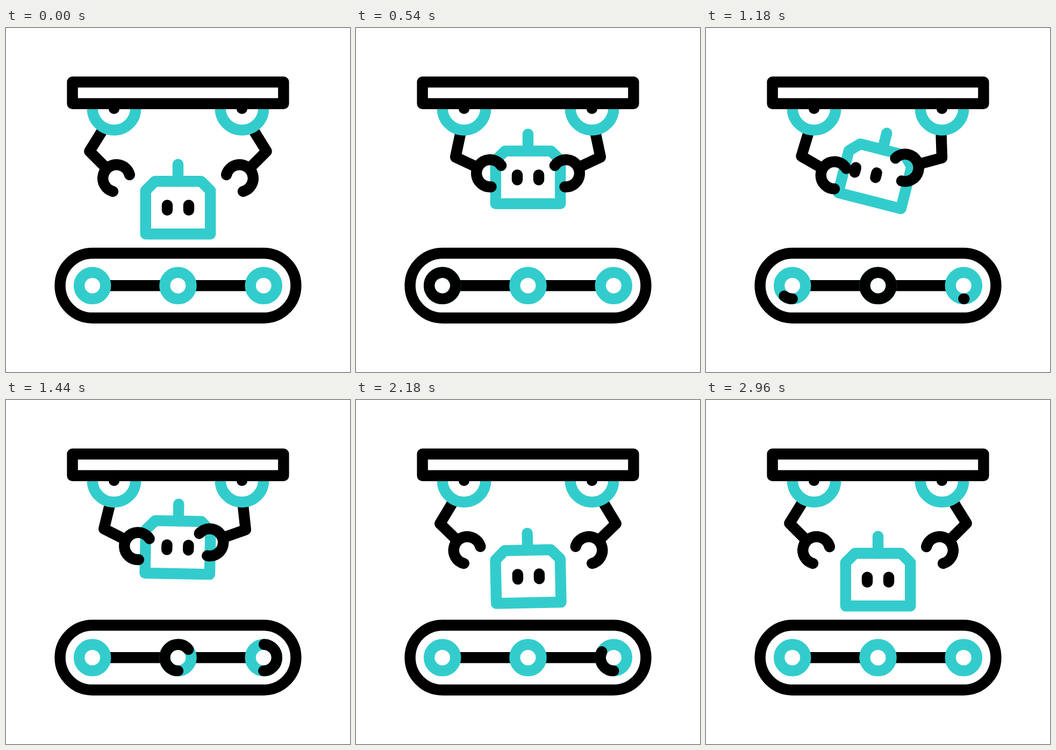
Write an HTML page with a canvas that moves like this. It is 640 px wide and 640 px high and loops after 3000 ms.

```html
<!DOCTYPE html>
<html lang="en">
<head>
<meta charset="utf-8">
<title>Robot assembly line</title>
<style>
html, body { margin: 0; width: 100%; height: 100%; overflow: hidden; background: #fff; }
canvas { display: block; width: 640px; height: 640px; }
</style>
</head>
<body>
<canvas id="stage" width="640" height="640"></canvas>
<script>
const ctx = document.getElementById('stage').getContext('2d');
const LOOP = 3000, STEP = 20, MID = 320;
const BLACK = '#000', TEAL = '#33cccc';
const TAU = Math.PI * 2, DEG = Math.PI / 180;

const ease = (t, from, to) => {
  const x = Math.min(1, Math.max(0, (t - from) / (to - from)));
  return x * x * (3 - 2 * x);
};

function pose(t) {
  const grab = ease(t, 200, 600);
  const swing = ease(t, 800, 1200);
  const back = ease(t, 1200, 1680);
  const release = ease(t, 1680, 2240);
  const drop = ease(t, 1680, 2300);
  const hop = ease(t, 2300, 2630) - ease(t, 2630, 2960);
  const reach = 21.2 * (grab - release), sway = swing - back;
  return {
    lift: 60 * (grab - drop) + 30 * hop,
    tilt: 14.4 * sway - 12.1 * (back - drop),
    gaze: -20 * sway + 19.3 * (back - release),
    left: reach - 6.2 * sway,
    right: reach + 8.8 * sway
  };
}

function stroke(color, cap = 'round') {
  ctx.strokeStyle = color;
  ctx.lineCap = cap;
  ctx.stroke();
}

function line(points, color, cap) {
  ctx.beginPath();
  for (const [x, y] of points) ctx.lineTo(x, y);
  stroke(color, cap);
}

function arc(x, y, r, from, to, color, cap) {
  ctx.beginPath();
  ctx.arc(x, y, r, from, to);
  stroke(color, cap);
}

function robot({ lift, tilt, gaze }) {
  const w = 60.2, top = -34.3, bottom = 63.7, cut = 17.3;
  ctx.save();
  ctx.translate(MID, 319.5 - lift);
  ctx.rotate(tilt * DEG);
  line([[0, -65.8], [0, top]], TEAL);
  ctx.beginPath();
  for (const s of [-1, 1]) {
    const side = [[s * w, bottom], [s * w, top + cut], [s * (w - cut), top]];
    if (s > 0) side.reverse();
    for (const [x, y] of side) ctx.lineTo(x, y);
  }
  ctx.closePath();
  stroke(TEAL);
  for (const x of [gaze - 20, gaze + 20]) line([[x, 10.3], [x, 19.3]], BLACK);
  ctx.restore();
}

// Left-hand arm with its shoulder at the origin; the right one is mirrored
function arm(side, angle) {
  ctx.save();
  ctx.translate(MID, 150);
  ctx.scale(side, 1);
  ctx.translate(-119, 0);

  ctx.save();
  ctx.rotate(-angle * DEG);
  line([[-19, 36.4], [-45.7, 79.4], [-13.2, 111.9]], BLACK, 'butt');
  arc(4.5, 129.6, 25.3, 105 * DEG, 345 * DEG, BLACK);
  ctx.restore();

  arc(0, -0.3, 40.2, 0, Math.PI, TEAL, 'butt');
  line([[0, -9], [0, -0.3]], BLACK);
  ctx.restore();
}

function roller(x, t) {
  const y = 479.3, r = 24.6;
  arc(x, y, r, 0, TAU, TEAL);
  const head = ease(t, 12, 592), tail = ease(t, 554, 1338);
  if (head <= 0 || tail >= 1) return;
  const at = p => (0.25 - p) * TAU;
  arc(x, y, r, at(head), at(tail), BLACK);
}

function belt(t) {
  ctx.beginPath();
  ctx.roundRect(100.6, 419, 438.8, 120.5, 60.2);
  stroke(BLACK);
  for (const x of [185, 345]) line([[x, 479.3], [x + 110, 479.3]], BLACK, 'butt');
  for (let i = 0; i < 3; i++) roller(MID + (i - 1) * 159.3, t - i * 570);
}

function draw(t) {
  const p = pose(t);
  ctx.fillStyle = '#fff';
  ctx.fillRect(0, 0, 640, 640);
  ctx.lineWidth = 20.4;
  ctx.lineJoin = 'round';
  belt(t);
  robot(p);
  arm(1, p.left);
  arm(-1, p.right);
  ctx.strokeStyle = BLACK;
  ctx.strokeRect(123.6, 100.5, 392.8, 40.3);
}

function tick() {
  const t = performance.now() % LOOP;
  draw(Math.floor(t / STEP) * STEP);
  requestAnimationFrame(tick);
}
tick();
</script>
</body>
</html>
```
